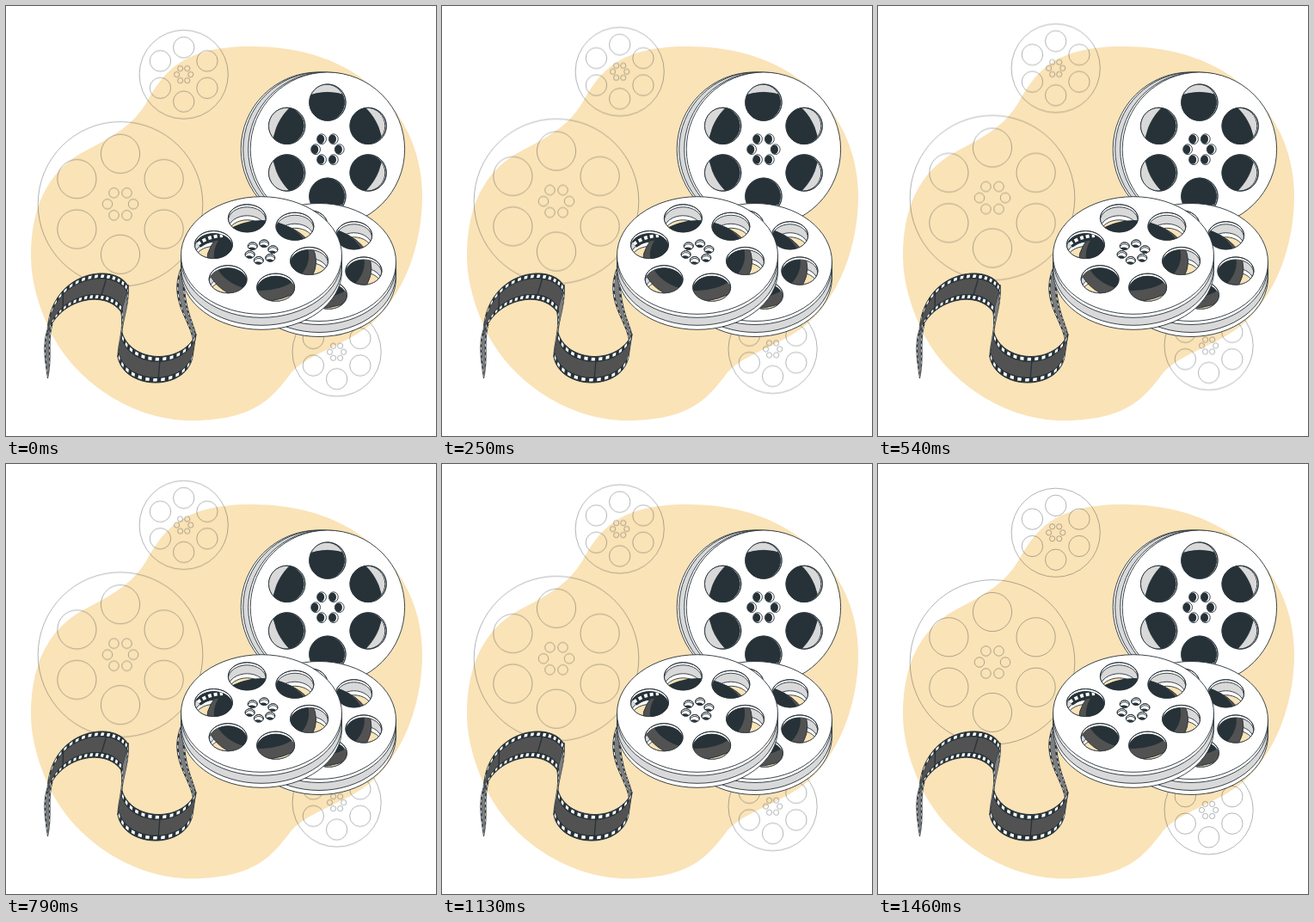
An HTML page that plays this animation: 500x500 px, repeating every 1.5 s.

```html
<!DOCTYPE html>
<html lang="en">
<head>
<meta charset="utf-8">
<title>Film reels</title>
<style>
  html, body { margin: 0; width: 100%; height: 100%; overflow: hidden; background: #fff; }
  svg { display: block; width: 100vw; height: 100vh; }
</style>
</head>
<body>
<svg id="stage" viewBox="0 0 500 500"></svg>
<script>
const INK = '#263238', WALL = '#d9d9d9', FILM = '#525252', BACK = '#7d7d7d', SAND = '#fae3b7';
const LINE = `stroke="${INK}" stroke-width=".9"`;

const ellipse = (x, y, rx, ry, attrs = '') =>
  `<ellipse cx="${x}" cy="${y}" rx="${rx}" ry="${ry}" ${attrs}/>`;
const disc = (x, y, rx, ry, fill) => ellipse(x, y, rx, ry, `fill="${fill}" ${LINE}`);
const path = (d, attrs) => `<path d="${d}" ${attrs}/>`;

let clips = 0;
function clipped(x, y, rx, ry, content) {
  const id = 'clip' + clips++;
  return `<clipPath id="${id}">${ellipse(x, y, rx, ry)}</clipPath>` +
    `<g clip-path="url(#${id})">${content}</g>`;
}

// Markup for six items evenly spaced on an ellipse
const ring = (x, y, rx, ry, start, draw) => Array.from({ length: 6 }, (_, i) => {
  const a = (start + i * 60) * Math.PI / 180;
  return draw(x + rx * Math.cos(a), y + ry * Math.sin(a));
}).join('');

function outlineReel(x, y, r) {
  const circle = k => (cx, cy) => ellipse(cx, cy, r * k, r * k);
  return circle(1)(x, y) +
    ring(x, y, r * .61, r * .61, 30, circle(.236)) +
    ring(x, y, r * .157, r * .157, 0, circle(.06));
}

function standingReel(x, y, r) {
  const roll = disc(x, y, r * .715, r * .74, INK);
  const opening = (cx, cy) => {
    const s = r * .236;
    return disc(cx, cy, s, s, '#fff') +
      clipped(cx, cy, s, s, disc(cx - 1.5, cy, s, s, WALL) + clipped(cx - 1.5, cy, s, s, roll)) +
      disc(cx, cy, s, s, 'none');
  };
  const hub = (cx, cy) => disc(cx, cy, 5.4, 5.9, '#fff') + ellipse(cx - 1, cy, 4.2, 5.2, `fill="${INK}"`);
  return disc(x - 11, y, r, r, '#fff') + disc(x - 8.5, y, r, r, WALL) +
    disc(x - 2.5, y, r, r, '#fff') + disc(x, y, r, r, '#fff') +
    ring(x, y, r * .608, r * .608, 30, opening) +
    ring(x, y, r * .154, r * .154, 0, hub);
}

// Heights of the layers below the face, seen at the rim and through the openings
const LIP = 4, GAP = 13, BASE = 18;

function lyingReel(x, y, rx, ry, turn, extras = '') {
  const side = (low, fill) => path(
    `M${x - rx} ${y}V${y + low}A${rx} ${ry} 0 0 0 ${x + rx} ${y + low}V${y}Z`, `fill="${fill}" ${LINE}`);
  const roll = disc(x, y + 7, rx * .68, ry * .68, FILM) +
    ellipse(x, y, rx * .59, ry * .6, `fill="${INK}"`) + extras;
  const opening = (cx, cy) => {
    const w = rx * .235, h = ry * .235;
    const layer = (drop, fill) => disc(cx, cy + drop, w, h, fill);
    return layer(0, '#fff') +
      clipped(cx, cy, w, h, layer(LIP - 1, WALL) +
        clipped(cx, cy + LIP - 1, w, h, layer(GAP, '#fff') + layer(BASE, SAND) + roll)) +
      layer(0, 'none');
  };
  const hub = (cx, cy) => disc(cx, cy, 5.5, 4.3, '#fff') +
    clipped(cx, cy, 5.5, 4.3, disc(cx, cy + 2, 5.5, 4.3, '#fff') +
      ellipse(cx - 1, cy + 5, 5.4, 3.6, `fill="${INK}"`)) + disc(cx, cy, 5.5, 4.3, 'none');
  return side(BASE, '#fff') + side(GAP, WALL) + side(LIP, '#fff') + disc(x, y, rx, ry, '#fff') +
    ring(x, y - 3, rx * .61, ry * .615, turn, opening) +
    ring(x, y - 4, rx * .15, ry * .147, turn + 30, hub);
}

// Point on a cubic curve given as x0, y0 ... x3, y3
const bezier = (c, t) => [0, 1].map(i => {
  const s = 1 - t;
  return s * s * s * c[i] + 3 * s * s * t * c[i + 2] + 3 * s * t * t * c[i + 4] + t * t * t * c[i + 6];
});

// Film between two curves, with windows punched along both edges
function ribbon(edgeA, edgeB, fill, windows, dividers = []) {
  const spot = (u, v) => {
    const a = bezier(edgeA, u), b = bezier(edgeB, u);
    return a.map((p, i) => (p + (b[i] - p) * v).toFixed(1)).join(' ');
  };
  const patch = (u0, u1, v0, v1, steps) => {
    const fore = [], aft = [];
    for (let i = 0; i <= steps; i++) {
      const u = u0 + (u1 - u0) * i / steps;
      fore.push(spot(u, v0));
      aft.unshift(spot(u, v1));
    }
    return 'M' + fore.concat(aft).join('L') + 'Z';
  };
  let holes = '';
  for (let i = 0; i < windows; i++) {
    const u = (i + .25) / windows, end = u + .5 / windows;
    holes += patch(u, end, .045, .165, 1) + patch(u, end, .835, .955, 1);
  }
  return path(patch(0, 1, 0, 1, 30), `fill="${INK}" ${LINE}`) +
    path(patch(0, 1, .21, .79, 30), `fill="${fill}"`) +
    path(holes, 'fill="#fff"') +
    dividers.map(u => path(`M${spot(u, .18)}L${spot(u, .82)}`, `stroke="${INK}" stroke-width="1.3"`)).join('');
}

const film =
  ribbon([48, 377, 42, 395, 46, 415, 48.5, 433], [54, 370, 48, 392, 54, 408, 48.5, 433], BACK, 9) +
  ribbon([142, 324, 144, 348, 135, 365, 135, 382], [133, 352, 138, 375, 130, 390, 130, 408], BACK, 10) +
  ribbon([203, 306, 188, 345, 218, 368, 218, 395], [206, 310, 208, 355, 216, 362, 221, 383], BACK, 12) +
  ribbon([48, 380, 50, 307, 128, 297, 142, 326], [48.5, 383, 56, 345, 112, 326, 134, 356], FILM, 17, [.3, .72]) +
  ribbon([135, 380, 146, 415, 205, 418, 221, 381], [130, 408, 137, 447, 209, 449, 217, 408], FILM, 13, [.53]);

const blob = path('M285 47C345 47 395 64 432 99C468 133 484 177 484 221C484 279 462 338 423 371' +
  'C395 394 352 404 332 426C310 455 290 482 215 482C150 482 85 440 55 385C38 352 29 320 29 291' +
  'C29 225 55 187 95 167C130 149 148 137 163 113C183 78 203 47 285 47Z', `fill="${SAND}"`);

// Perforated film edge glimpsed through the left opening
const glimpse = ['stroke="' + INK + '" stroke-width="10"', 'stroke="#fff" stroke-width="4" stroke-dasharray="4 3"']
  .map(s => path('M223 277Q234 268 252 267', 'fill="none" ' + s)).join('');

document.getElementById('stage').innerHTML = blob +
  `<g id="float" fill="none" stroke="${INK}" stroke-opacity=".45" stroke-width=".8">` +
  outlineReel(133, 230.5, 95.8) + outlineReel(206.7, 79.8, 51.6) + outlineReel(384.6, 402.4, 51.6) + '</g>' +
  film + standingReel(373.9, 166.7, 89.7) +
  lyingReel(364, 298, 89.5, 68.5, 18) + lyingReel(297, 290, 93.5, 68.3, 13, glimpse);

document.getElementById('float').animate([
  { transform: 'translateY(0px)', offset: 0 },
  { transform: 'translateY(-9.8px)', offset: .475 },
  { transform: 'translateY(0px)', offset: .97 },
  { transform: 'translateY(0px)', offset: 1 }
], { duration: 1500, iterations: Infinity });
</script>
</body>
</html>
```
